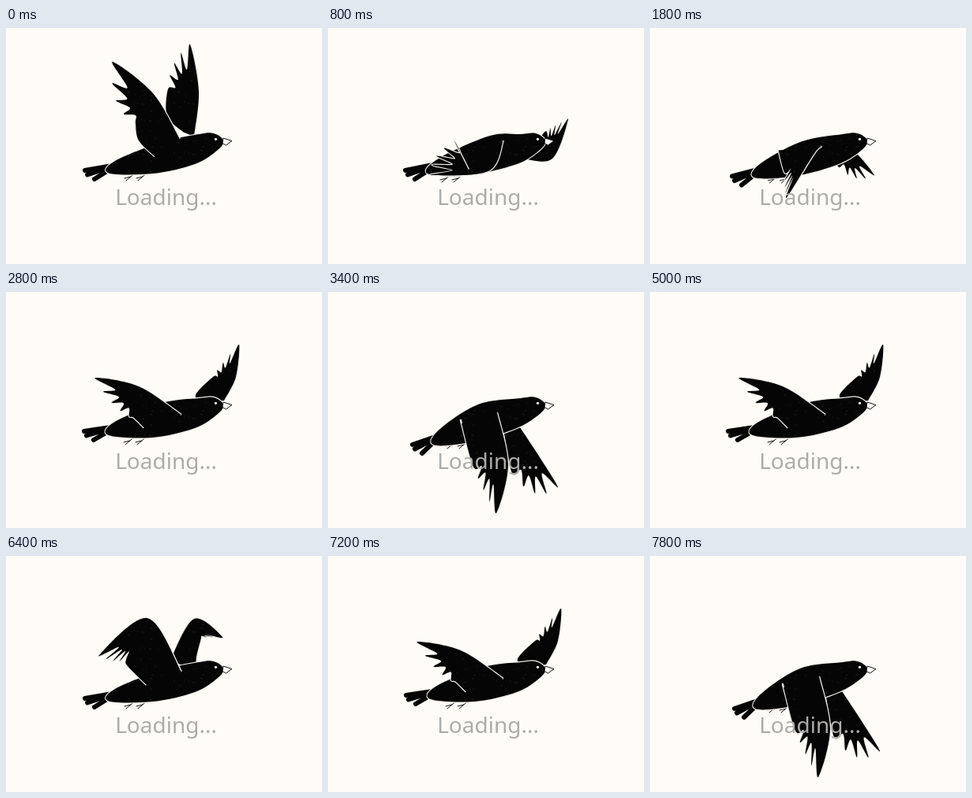
Animation, 400 px wide and 300 px high, one loop 8 s. Source, as an HTML page:

```html
<!DOCTYPE html>
<html lang="en">
<head>
<meta charset="utf-8">
<title>Loading</title>
<style>
  html, body { margin: 0; width: 100%; height: 100%; overflow: hidden; background: #fffcf7; }
  svg { display: block; width: 100%; height: 100%; }
  .ink { fill: #050505; stroke: #f4f1ec; stroke-width: 2.4; stroke-linejoin: round; paint-order: stroke; }
  .grain { fill: url(#scratches); }
  .tail { fill: none; stroke: #050505; stroke-width: 6; stroke-linecap: round; }
  .legs { fill: none; stroke: #111; stroke-linecap: round; stroke-linejoin: round; }
  .beak { fill: #fffcf7; stroke: #111; stroke-linejoin: round; }
  text { font: 28px "Noto Sans", sans-serif; fill: #aeacaa; }
</style>
</head>
<body>
<svg viewBox="0 0 400 300">
  <pattern id="scratches" width="64" height="64" patternUnits="userSpaceOnUse">
    <path id="marks" fill="none" stroke="#2c2c2c" stroke-width=".6"/>
  </pattern>
  <g id="bird"></g>
  <text x="138.2" y="225">Loading...</text>
</svg>
<script>
const points = list => list.split(' ').map(pair => pair.split(',').map(Number));

// Wings: leading root, wrist, longest tip, curve of the tips, last tip, trailing root.
// Body: back, belly, tail tip.
const pose = (step, ease, near, far, body) =>
  ({ step, ease, near: points(near), far: points(far), body: points(body) });

const poses = [
  pose(0, 1, '222,143 203,182 130,187 130,160 160,144 178,180',
    '246,166 284,166 304,116 286,124 276,131 268,140', '205,137 178,187 98,181'),
  pose(2, 3, '214,153 228,220 213,281 195,252 184,222 169,167',
    '243,172 266,207 291,248 262,273 233,230 223,180', '190,143 185,190 107,194'),
  pose(6, 1, '222,147 179,79 118,126 136,138 152,132 154,140',
    '208,132 238,80 274,103 262,102 247,104 241,138', '195,146 186,185 100,181'),
  pose(7, 1, '220,141 186,83 135,43 129,103 164,121 168,143',
    '238,138 244,80 233,21 207,40 205,78 204,112', '195,146 186,185 100,181'),
  pose(10, 1, '222,156 168,120 113,109 133,148 156,158 162,160',
    '276,138 291,108 295,67 271,92 262,108 240,131', '198,141 185,185 99,177')
];

const mix = (a, b, t) => a.map((v, k) => v + (b[k] - v) * t);
const shift = (a, x, y) => [a[0] + x, a[1] + y];

function poseAt(step) {
  const i = poses.findLastIndex(p => p.step <= step);
  const from = poses[i], to = poses[i + 1];
  if (from.step === step) return from;
  const t = ((step - from.step) / (to.step - from.step)) ** from.ease;
  const blend = part => from[part].map((p, k) => mix(p, to[part][k], t));
  return { near: blend('near'), far: blend('far'), body: blend('body') };
}

// Smooth curve through points
function smooth(pts, closed) {
  const n = pts.length;
  const at = i => closed ? pts[(i + n) % n] : pts[Math.max(0, Math.min(n - 1, i))];
  const lean = (a, b, c) => a.map((v, k) => v + (c[k] - b[k]) / 6);
  let d = 'M' + pts[0];
  for (let i = 0; i < (closed ? n : n - 1); i++) {
    const a = at(i), b = at(i + 1);
    d += `C${lean(a, at(i - 1), b)} ${lean(b, at(i + 2), a)} ${b}`;
  }
  return d;
}

const path = (cls, d) => `<path class="${cls}" d="${d}"/>`;
const solid = d => path('ink', d) + path('grain', d);

function drawWing([lead, wrist, tip, fan, last, trail]) {
  const FEATHERS = 5;
  const palm = mix(wrist, trail, .3);
  const tipAt = t => mix(mix(tip, fan, t), mix(fan, last, t), t);
  const edge = [lead, wrist];
  for (let i = 0; i < FEATHERS; i++) {
    const t = i / (FEATHERS - 1), gap = .5 / (FEATHERS - 1);
    edge.push(tipAt(t));
    if (t < 1) edge.push(mix(tipAt(t + gap), palm, .42 - .12 * t));
  }
  // A raised wing overlaps the body further at its trailing root
  const lift = Math.max(0, lead[1] - wrist[1]) * .35;
  edge.push(trail, shift(trail, lift, lift));
  return solid(smooth(edge));
}

function drawBody([back, belly, tail]) {
  const outline = [
    [275, 143], [263, 134], [244, 135], back,
    shift(mix(tail, back, .4), 0, 2), shift(mix(tail, belly, .35), 0, 2),
    belly, [239, 173], [268, 155]
  ];
  return solid(smooth(outline, true));
}

function drawTail([back, belly, tail]) {
  const base = mix(tail, mix(back, belly, .5), .45);
  const feather = i => `M${base}L${shift(tail, 3 * i * i, 5.5 * i)}`;
  return path('tail', [0, 1, 2].map(feather).join(''));
}

function drawLegs([, belly]) {
  const leg = x => `M${shift(belly, x, -3)}l-8 7-8 2m8-2l-6 5`;
  return path('legs', leg(-20) + leg(-5));
}

function drawBird(step) {
  const { near, far, body } = poseAt(step);
  return '<g display="none">' + drawLegs(body) + drawWing(far) + drawTail(body) +
    drawBody(body) + drawWing(near) +
    path('beak', 'M275 140L286 143.5L278.5 149L274 146.5Z') +
    '<circle cx="265.5" cy="141.3" r="1.6" fill="#fffcf7"/></g>';
}

let seed = 7;
const random = span => (seed = seed * 16807 % 2147483647) / 2147483647 * span;
const scratch = () => `M${random(60)} ${random(60)}l${random(3)} ${random(4) - 2}`;
document.getElementById('marks').setAttribute('d', Array.from({ length: 26 }, scratch).join(''));

const STEPS = 11, STEP = 200, CYCLE = STEPS * STEP, LOOP = 8000, OFFSET = 1430, GAP = 30;
poses.push({ ...poses[0], step: STEPS });

const bird = document.getElementById('bird');
bird.innerHTML = Array.from({ length: STEPS }, (_, step) => drawBird(step)).join('');
const views = [...bird.children];
let shown = -1;

function frame() {
  const phase = (performance.now() % LOOP + OFFSET) % CYCLE;
  // The bird is absent for a moment where its wing cycle restarts
  const step = Math.floor((phase - GAP) / STEP);
  if (step !== shown) {
    views.forEach((view, i) => view.setAttribute('display', i === step ? 'inline' : 'none'));
    shown = step;
  }
  requestAnimationFrame(frame);
}
frame();
</script>
</body>
</html>
```
